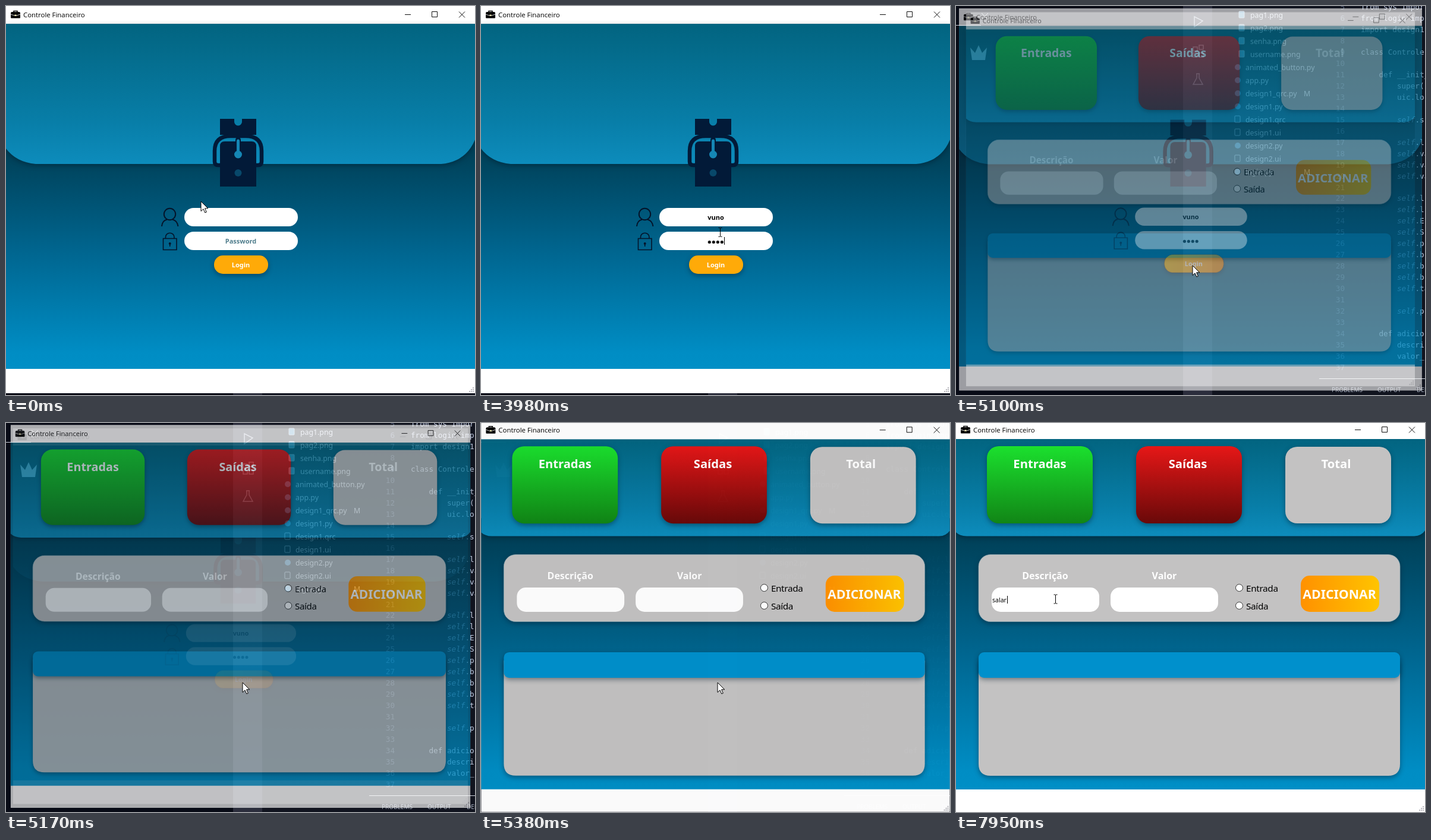
An HTML page for the animation above (8 s loop, 789 by 655 pixels).

```html
<!DOCTYPE html>
<html lang="pt">
<head>
<meta charset="utf-8">
<title>Controle Financeiro</title>
<style>
  html, body { margin: 0; width: 100%; height: 100%; overflow: hidden; background: #080b16; }
  svg { display: block; width: 789px; height: 655px; }
  text { font-family: "Noto Sans", sans-serif; }
  .mid { text-anchor: middle; }
  .bold { font-weight: 700; }
  .small { font-size: 11px; }
  .title { font: 11.4px "Open Sans", sans-serif; }
  .card { font-size: 20.2px; fill: #fff; }
  .label { font-size: 16px; fill: #fff; }
  .radio { font-size: 15.3px; letter-spacing: -.35px; }
  .code { font: 12.65px "DejaVu Sans Mono", monospace; fill: #c3cde4; white-space: pre; }
  .self { fill: #7d9cc0; font-style: italic; }
  .num { text-anchor: end; fill: #556078; }
  .files { font-size: 12.3px; fill: #ccd4e4; }
  .line { fill: none; stroke: #04142a; }
  .shadow { filter: drop-shadow(0 3px 4px rgba(0, 25, 40, .45)); }
</style>
</head>
<body>
<svg viewBox="0 0 789 655">
  <defs>
    <linearGradient id="flap" x2="0" y2="1">
      <stop stop-color="#026480"/><stop offset=".7" stop-color="#087ea8"/><stop offset="1" stop-color="#0d8cbc"/>
    </linearGradient>
    <linearGradient id="body" x2="0" y2="1">
      <stop stop-color="#003b53"/><stop offset=".1" stop-color="#00435c"/>
      <stop offset=".5" stop-color="#006690"/><stop offset=".93" stop-color="#008dc4"/><stop offset="1" stop-color="#008fc6"/>
    </linearGradient>
    <linearGradient id="green" x2="0" y2="1"><stop stop-color="#1be02e"/><stop offset="1" stop-color="#118516"/></linearGradient>
    <linearGradient id="red" x2="0" y2="1"><stop stop-color="#e61717"/><stop offset="1" stop-color="#690909"/></linearGradient>
    <linearGradient id="orange"><stop stop-color="#ff9100"/><stop offset="1" stop-color="#ffc400"/></linearGradient>
    <linearGradient id="amber"><stop stop-color="#ffc400"/><stop offset="1" stop-color="#ff9100"/></linearGradient>
    <g id="chrome">
      <path fill="#fff" d="M0 0H789V30H0Z"/>
      <path d="M8 12q0-2 2-2H22q2 0 2 2V19.500q0 1-1 1H9q-1 0-1-1Z"/>
      <path d="M13 10V8.500H19V10" fill="none" stroke="#000" stroke-width="1.500"/>
      <path d="M8 14L14 16H18L24 14" fill="none" stroke="#fff" stroke-width=".8"/>
      <path d="M14.500 14.500H17.500V17H14.500Z" fill="#e6e2b0"/>
      <text class="title" x="29" y="19">Controle Financeiro</text>
      <path d="M671 14.500H681M716.500 9.500H725.500V18.500H716.500ZM762 9.500L772 19.500M772 9.500L762 19.500" fill="none" stroke="#111"/>
    </g>
    <path id="grip" d="M785 642h2v2h-2zm0 3h2v2h-2zm0 3h2v2h-2zm-3-3h2v2h-2zm0 3h2v2h-2zm-3 0h2v2h-2z" fill="#b5b5bb"/>
  </defs>

  <g id="editor">
    <path fill="#080b16" d="M0 0H789V655H0Z"/>
    <path fill="#2b2d3c" d="M382 0H431V655H382Z"/>
    <path fill="#11141f" d="M431 0H789V655H431Z"/>
    <path d="M0 32.500H42M43 12L54 23M54 12L43 23M611 627.500H789" stroke="#cdd2dc" fill="none"/>
    <path d="M27 91L24 70L32 79L38 66L44 79L52 70L49 91Z" fill="#9fb4c8"/>
    <path d="M401 18L415 25L401 35ZM399 69H406V76H399ZM409 66H416V73H409ZM399 79H406V86H399ZM409 79H416V86H409ZM404 114H410M405 114V121L399 132H415L409 121V114" fill="none" stroke="#a9b1c4" stroke-width="1.500"/>
  </g>

  <g id="login">
    <path fill="#fff" d="M0 0H789V652H0Z"/>
    <use href="#chrome"/>
    <path fill="url(#body)" d="M0 220H789V611H0Z"/>
    <path class="shadow" fill="url(#flap)" d="M0 30H789V225Q774 262 732 266H50Q17 263 0 240Z"/>
    <g fill="#021a38">
      <path d="M360 190H384V195A6.500 6.500 0 0 0 397 195V190H421V217H360Z"/>
      <path d="M360 304V236Q360 228 368 228H413Q421 228 421 236V304Z"/>
      <path d="M360 268H357Q351 268 351 262V244Q351 219 378 219H403Q430 219 430 244V262Q430 268 424 268H421" fill="none" stroke="#021a38" stroke-width="6.500"/>
      <path d="M386 230V226Q386 221 390.500 221T395 226V230Z"/>
    </g>
    <path d="M390.500 227V250" stroke="#1587b5" stroke-width="5" stroke-linecap="round"/>
    <circle cx="390.500" cy="250" r="6.500" fill="#1587b5"/>
    <circle cx="390.500" cy="281" r="6" fill="#08486a"/>
    <g class="line" stroke-width="2">
      <circle cx="275.500" cy="350.500" r="9.700"/>
      <path d="M262 371Q263 361 271 359.500M280 359.500Q288 361 289.500 371"/>
      <path stroke-width="1.600" d="M264.500 391.500H287V410.500H264.500ZM268.500 391V389a7.200 6.800 0 0 1 14.400 0V391M275.700 400V405"/>
      <circle cx="275.700" cy="400" r="1"/>
    </g>
    <g fill="#fff">
      <rect x="300" y="340" width="191" height="31" rx="15.500"/>
      <rect x="300" y="380" width="191" height="31" rx="15.500"/>
    </g>
    <text id="user" class="bold mid small" x="395" y="360"></text>
    <text id="hint" class="bold mid small" x="395" y="400" fill="#4f7d8c">Password</text>
    <g id="dots" fill="#111"></g>
    <path id="caretUser" stroke="#000"/>
    <path id="caretPass" stroke="#000"/>
    <g class="shadow">
      <rect class="button" x="350" y="420" height="31" rx="15" fill="#ffaa08"/>
      <rect id="hover" class="button" x="350" y="420" height="31" rx="15" fill="url(#amber)"/>
    </g>
    <rect id="focus" class="button" x="350" y="420" height="31" rx="15" fill="none" stroke="#222" stroke-dasharray="1 1"/>
    <text id="loginText" class="bold mid small" y="440" fill="#fff">Login</text>
    <use href="#grip"/>
  </g>

  <g id="app">
    <path fill="#fff" d="M0 0H789V655H0Z"/>
    <path fill="url(#body)" d="M0 160H789V617H0Z"/>
    <path class="shadow" fill="url(#flap)" d="M0 27H789V181Q783 190 771 190.500H18Q6 190 0 184Z"/>
    <use href="#chrome" y="-3"/>
    <g class="shadow">
      <rect x="52" y="39" width="178" height="130" rx="20" fill="url(#green)"/>
      <rect x="303" y="39" width="178" height="130" rx="20" fill="url(#red)"/>
      <rect x="554" y="40" width="178" height="129" rx="20" fill="#c3c2c2"/>
      <rect x="38" y="221.500" width="709" height="113" rx="20" fill="#c3c2c2" stroke="#8caab4" stroke-width=".7"/>
      <path d="M38 400H747V574Q747 594 727 594H58Q38 594 38 574Z" fill="#c3c2c2"/>
    </g>
    <rect class="shadow" x="38" y="386" width="709" height="43" rx="9" fill="#0090cc"/>
    <g class="bold mid">
      <text class="card" x="141" y="76">Entradas</text>
      <text class="card" x="390" y="76">Saídas</text>
      <text class="card" x="639.500" y="76">Total</text>
      <text class="label" x="150" y="263">Descrição</text>
      <text class="label" x="350.500" y="263">Valor</text>
    </g>
    <g fill="#fff">
      <rect x="60" y="277" width="181" height="41" rx="15"/>
      <rect x="260" y="277" width="181" height="41" rx="15"/>
      <g stroke="#333"><circle cx="476.500" cy="277.500" r="6"/><circle cx="476.500" cy="307.500" r="6"/></g>
    </g>
    <text class="radio" x="488" y="284">Entrada</text>
    <text class="radio" x="488" y="314">Saída</text>
    <rect x="580" y="257" width="132" height="61" rx="15" fill="url(#orange)"/>
    <text class="bold mid" x="645" y="296" font-size="21.300" fill="#fff">ADICIONAR</text>
    <text id="desc" x="61" y="302" font-size="10.500"></text>
    <path id="caretDesc" stroke="#000"/>
    <use href="#grip" y="3"/>
  </g>

  <path id="arrow" d="M0 0V16.500L4 12.800L6.800 19L9.300 18L6.600 11.800H11.800Z" fill="#fff" stroke="#000"/>
  <path id="beam" d="M-3-7.500H-1L0-7L1-7.500H3M0-7V7M-3 7.500H-1L0 7L1 7.500H3" fill="none" stroke="#000"/>
</svg>

<script>
const LOOP = 8000, STEP = 70;
const $ = id => document.getElementById(id);
const make = (parent, name, attrs, text = '') => {
  const node = document.createElementNS('http://www.w3.org/2000/svg', name);
  for (const key in attrs) node.setAttribute(key, attrs[key]);
  node.textContent = text;
  return parent.appendChild(node);
};
const set = (node, name, value) => node.setAttribute(name, value);
const show = (id, on) => { $(id).style.visibility = on ? 'visible' : 'hidden'; };
const between = (t, ...spans) => spans.some(([from, to]) => t >= from && t < to);

function buildEditor() {
  const editor = $('editor');
  const files = ['pag1.png', 'pag2.png', 'senha.png', 'username.png', 'animated_button.py', 'app.py',
    'design1_qrc.py', 'design1.py', 'design1.qrc', 'design1.ui', 'design2.py', 'design2.ui', 'login.py'];
  files.forEach((name, i) => {
    const y = 20 + i * 22, nested = name.endsWith('png');
    if (name.endsWith('py')) make(editor, 'circle', { cx: 474, cy: y - 5, r: 5, fill: '#4b8bbe' });
    else make(editor, 'rect', { x: nested ? 476 : 469, y: y - 11, width: 9, height: 11, rx: 1, fill: nested ? '#5a9cc4' : 'none', stroke: '#a9b9cc' });
    make(editor, 'text', { class: 'files', x: nested ? 495 : 487, y }, name);
    if (/qrc.py|login/.test(name)) make(editor, 'text', { class: 'files', x: 585, y }, 'M');
  });
  const lines = ['from sys impor', 'from login imp', 'import design1', '', 'class Controle', '', '    def __init_',
    '        super(', '        uic.lo', '', '@s', '', '@l', '@va', '@va', '@va', '', '@l', '@l', '@E', '@S', '@p',
    '@b', '@b', '@b', '@ta', '', '@p', '', '    def adicio', '        descri', '        valor_', ''];
  lines.forEach((line, i) => {
    const y = 6 + i * 18.97, own = line[0] === '@';
    make(editor, 'text', { class: 'code num', x: 654, y }, i + 5);
    const text = make(editor, 'text', { class: 'code', x: own ? 742 : 681, y }, own ? '' : line);
    if (own) {
      make(text, 'tspan', { class: 'self' }, 'self');
      make(text, 'tspan', {}, '.' + line.slice(1));
    }
  });
  [[632, 'PROBLEMS'], [709, 'OUTPUT'], [775, 'DEBUG']].forEach(([x, label]) =>
    make(editor, 'text', { x, y: 650, 'font-size': 10, fill: '#a0a8b8' }, label));
}

function track(keys, t) {
  const i = keys.findLastIndex(key => t >= key[0]);
  if (i < 0) return keys[0].slice(1);
  const a = keys[i], b = keys[i + 1];
  if (!b) return a.slice(1);
  const u = Math.floor((t - a[0]) / STEP) * STEP / (b[0] - a[0]);
  const e = u * u * (3 - 2 * u);
  return a.slice(1).map((v, k) => v + (b[k + 1] - v) * e);
}
// Latest value of a list of [time, value].
const held = (list, t) => list.findLast(([from]) => t >= from)[1];

const pointer = [[0, 328, 329], [270, 410, 363], [3370, 410, 363], [3440, 403, 362], [3770, 403, 362],
  [4400, 398, 437], [5710, 398, 437], [6480, 167, 297]];
const buttonWidth = [[4200, 91], [4480, 101]];
const loginFade = [[5030, 1, 1], [5100, .6, .987], [5170, .25, .97], [5240, 0, .96]];
const appFade = [[5030, 0, .93], [5100, .4, .957], [5170, .66, .98], [5240, .85, .9915], [5310, .94, .997], [5380, .98, .999], [5450, 1, 1]];
const userTyped = [[0, ''], [1390, 'v'], [1590, 'vun'], [1790, 'vuno']];
const dotCount = [[0, 0], [2520, 1], [3180, 2], [3840, 3], [3980, 4]];
const descTyped = [[0, ''], [7410, 's'], [7480, 'sa'], [7610, 'sal'], [7750, 'sala'], [7880, 'salar']];

function placeWindow(id, [opacity, scale], cy) {
  set($(id), 'opacity', opacity);
  set($(id), 'transform', `translate(394 ${cy}) scale(${scale}) translate(-394 ${-cy})`);
  $(id).style.display = opacity ? '' : 'none';
}
function caret(id, x, y, on) {
  set($(id), 'd', on ? `M${Math.round(x) + .5} ${y}v13` : '');
}

function render(t) {
  placeWindow('login', track(loginFade, t), 300);
  placeWindow('app', track(appFade, t), 310);

  const user = $('user'), desc = $('desc');
  user.textContent = held(userTyped, t);
  desc.textContent = held(descTyped, t);
  caret('caretUser', 395 + user.getComputedTextLength() / 2, 349, between(t, [670, 1260], [1390, 2320]));
  caret('caretDesc', 62 + desc.getComputedTextLength(), 291, between(t, [6610, 6680], [7410, LOOP]));

  const count = held(dotCount, t);
  [...$('dots').children].forEach((dot, i) => {
    set(dot, 'cx', 394.8 + (i - (count - 1) / 2) * 7);
    set(dot, 'r', i < count ? 2.6 : 0);
  });
  caret('caretPass', 394.5 + count * 3.5, 389, between(t, [2320, 3050], [3180, 4610]));
  $('hint').style.display = t < 2320 ? '' : 'none';

  const [width] = track(buttonWidth, t);
  document.querySelectorAll('.button').forEach(rect => set(rect, 'width', width));
  set($('hover'), 'opacity', (width - 91) / 10);
  set($('focus'), 'opacity', t >= 4610 ? 1 : 0);
  set($('loginText'), 'x', 349.5 + width / 2);

  const [x, y] = track(pointer, t);
  const inside = (x0, y0, x1, y1) => x > x0 && x < x1 && y > y0 && y < y1;
  const typing = t < 5030 ? inside(300, 340, 491, 371) || inside(300, 380, 491, 411) : inside(60, 277, 241, 318);
  set($('arrow'), 'transform', `translate(${x} ${y})`);
  set($('beam'), 'transform', `translate(${Math.round(x) + .5} ${y - .5})`);
  show('arrow', !typing);
  show('beam', typing);
}

buildEditor();
for (let i = 0; i < 4; i++) make($('dots'), 'circle', { cy: 397.5 });
const start = performance.now();
function tick() {
  render((performance.now() - start) % LOOP);
  requestAnimationFrame(tick);
}
tick();
</script>
</body>
</html>
```
